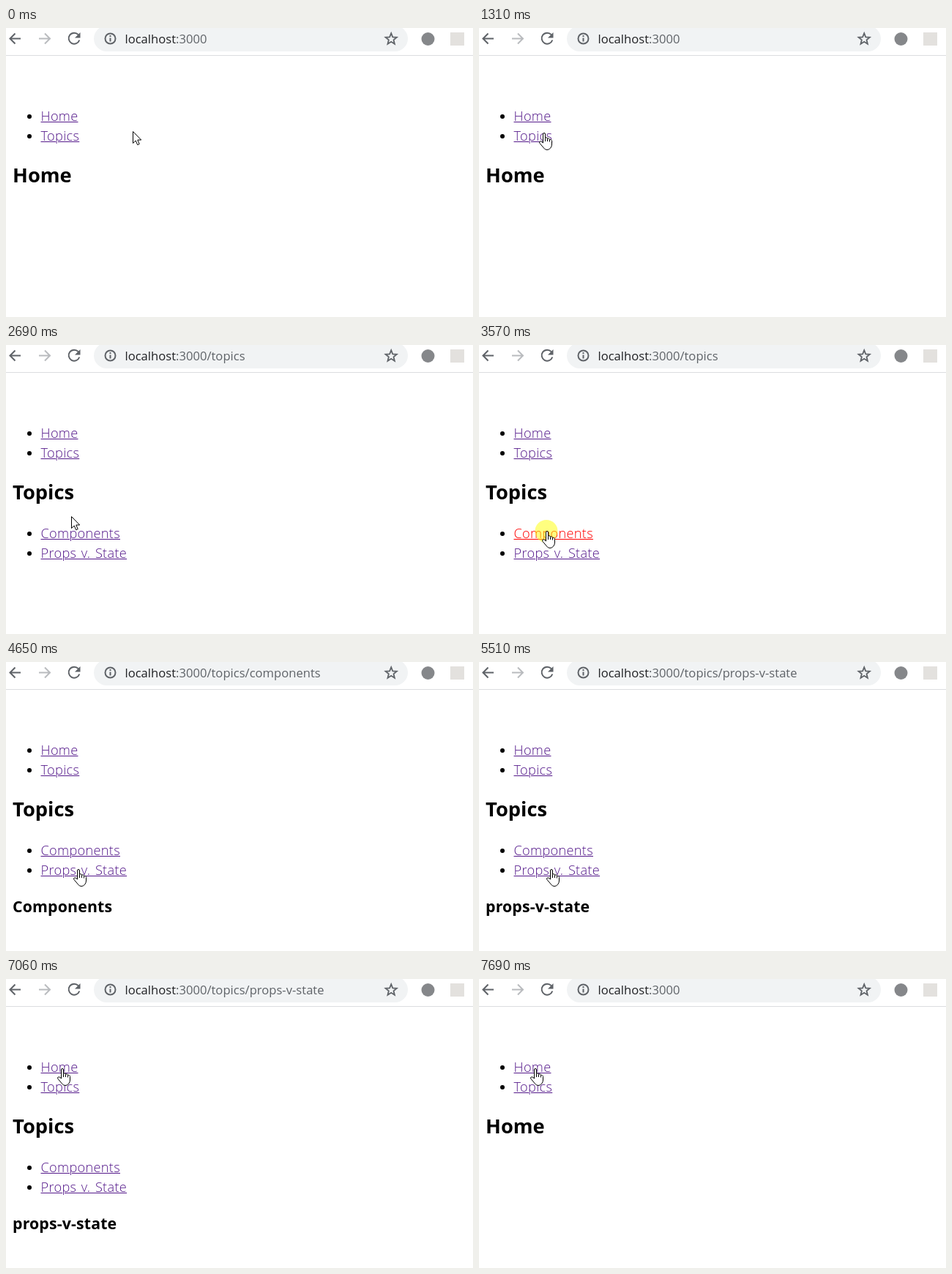
An HTML page for the animation above (8.31 s loop, 638 by 395 pixels).

```html
<!DOCTYPE html>
<html lang="en">
<head>
<meta charset="utf-8">
<title>Nested routes</title>
<style>
  html, body { margin: 0; width: 100%; height: 100%; overflow: hidden; background: #fff; }
  #stage { position: relative; width: 638px; height: 395px; overflow: hidden; }
  svg { position: absolute; left: 0; top: 0; }
  #stage > div { position: absolute; white-space: pre; line-height: normal; }
  .link {
    left: 47.5px; font: 300 18.2px "Open Sans", sans-serif; color: #551a8b;
    letter-spacing: .3px; word-spacing: 1.5px;
    text-decoration: underline 1px; text-underline-offset: 1px;
  }
  .link::before {
    content: ""; position: absolute; left: -18.5px; top: 10px;
    width: 6px; height: 6px; border-radius: 50%; background: #000;
  }
  .link.active { color: #f00; }
  .title, .subtitle { left: 9px; font: bold 27.3px "Noto Sans", sans-serif; color: #000; }
  .title { top: 182px; }
  .subtitle { top: 319px; font-size: 21.3px; letter-spacing: .15px; }
  .url { left: 162.500px; top: 3px; font: 16.6px "Open Sans", sans-serif; color: #5f6368; }
  .url b { font-weight: 400; color: #202124; }
</style>
</head>
<body>
<div id="stage">
  <svg width="638" height="395" fill="none" stroke="#5f6368" stroke-width="2">
    <rect x="120" y="-3" width="429" height="35" rx="17.5" fill="#f1f3f4" stroke="none"/>
    <rect y="37" width="638" height="1" fill="#dcdde0" stroke="none"/>
    <path d="M20 14.500H6M12.500 7.500l-7 7 7 7"/>
    <path d="M45 14.500H59.500M53 7.500l7 7-7 7" stroke="#b9bbbe"/>
    <path d="M98.800 9.200A7.500 7.500 0 1 0 100.300 16.500"/>
    <path d="M101.500 6v7.500H94z" fill="#5f6368" stroke="none"/>
    <circle cx="142.500" cy="14.500" r="7"/>
    <path d="M142.500 13.500v5M142.500 10v2"/>
    <path id="star" stroke-width="1.800"/>
    <circle cx="576.500" cy="15" r="9" fill="#85878a" stroke="none"/>
    <rect x="607" y="6" width="19" height="18" fill="#e3e1de" stroke="none"/>
  </svg>
  <div class="url"><b>localhost</b>:3000<span id="path"></span></div>
  <div class="title" id="title"></div>
  <div class="subtitle" id="subtitle"></div>
  <svg id="overlay" width="638" height="395">
    <circle id="halo" r="15.500" fill="#ff0"/>
    <g id="cursor" fill="#fff" stroke="#000" stroke-linejoin="round">
      <path id="arrow" d="M.5.5V16.500L4.200 13 6.700 18.700 9.200 17.600 6.800 12H11.700Z"/>
      <g id="hand" transform="translate(-6 0)">
        <path d="M5.500 13V2Q5.500.5 7 .5T8.500 2V7.500Q9 6.500 10.200 6.800 11.500 7 11.500 8.300
          12.300 7.600 13.300 8 14.500 8.400 14.500 9.600 15.500 9 16.500 9.600 17.500 10.200 17.500 11.500
          V16Q17.500 19 15.500 21.300 13.500 23.500 11 23.500 8 23.500 6.500 21L1 14.500Q0 12.800 1.300 12
          2.700 11.400 4 12.600L5.500 14Z"/>
        <path d="M8.500 7.500V12M11.500 8.300V12M14.500 9.600V12.500" fill="none"/>
      </g>
      <path id="beam" fill="none" d="M-3-7.500H-1L.5-6.500 2-7.500H4M.5-6.500V6.500M-3 7.500H-1L.5 6.500 2 7.500H4"/>
    </g>
  </svg>
</div>
<script>
const LOOP = 8310, FADE = 70;
const $ = id => document.getElementById(id);

const LINKS = [
  { text: "Home", top: 108, right: 98 },
  { text: "Topics", top: 135, right: 100 },
  { text: "Components", top: 245, right: 155, nested: true },
  { text: "Props v. State", top: 272, right: 166, nested: true }
];

const PAGES = [
  { from: 0, title: "Home", path: "", subtitle: "" },
  { from: 1930, title: "Topics", path: "/topics", subtitle: "" },
  { from: 3650, title: "Topics", path: "/topics/components", subtitle: "Components" },
  { from: 5440, title: "Topics", path: "/topics/props-v-state", subtitle: "props-v-state" },
  { from: 7610, title: "Home", path: "", subtitle: "" }
];

const CLICKS = [
  { down: 1780, up: 1930, link: 1 },
  { down: 3570, up: 3650, link: 2 },
  { down: 5270, up: 5440, link: 3 },
  { down: 7460, up: 7610, link: 0 }
];

// Each move visits its points at even steps from start to end.
const MOVES = [
  { start: 0, end: 0, points: [[173, 141]] },
  { start: 680, end: 1310, points: [[171, 140], [163, 138], [150, 139], [135, 141],
    [120, 143], [106, 144], [96, 145], [90, 144], [88, 143]] },
  { start: 2470, end: 3090, points: [[88, 152], [88, 182], [89, 213], [89, 234],
    [90, 243], [91, 248], [91, 251], [92, 253], [92, 254]] },
  { start: 4270, end: 4650, points: [[92, 258], [94, 266], [95, 273], [97, 279], [98, 282], [98, 283]] },
  { start: 6130, end: 6910, points: [[97, 272], [96, 250], [95, 225], [94, 200], [93, 182],
    [91, 168], [88, 158], [85, 148], [82, 140], [79, 134], [78, 131]] },
  { start: 6980, end: 7060, points: [[77, 125], [76, 122]] }
];

for (const link of LINKS) {
  link.el = document.createElement("div");
  link.el.className = "link";
  link.el.textContent = link.text;
  link.el.style.top = link.top + "px";
  $("stage").insertBefore(link.el, $("overlay"));
}

const starPoints = Array.from({ length: 10 }, (_, i) => {
  const r = i % 2 ? 3.5 : 8, a = i * Math.PI / 5;
  return `${526.2 + r * Math.sin(a)} ${15.2 - r * Math.cos(a)}`;
});
$("star").setAttribute("d", `M${starPoints.join("L")}Z`);

function pointerAt(t) {
  const { start, end, points } = MOVES.findLast(m => t >= m.start);
  const last = points.length - 1;
  const step = last ? Math.floor((t - start) / (end - start) * last + 0.2) : 0;
  return points[Math.min(last, step)];
}

function cursorKind(x, y, page) {
  const overLink = LINKS.some(l => (!l.nested || page.title === "Topics") &&
    x >= 48 && x <= l.right && y >= l.top + 2 && y <= l.top + 24);
  if (overLink) return "hand";
  return x >= 10 && x <= 96 && y >= 180 && y <= 222 ? "beam" : "arrow";
}

function render(t) {
  const page = PAGES.findLast(p => t >= p.from);
  const click = CLICKS.find(c => t >= c.down && t < c.up + FADE);
  const pressed = click && t < click.up;
  const [x, y] = pointerAt(t);
  const kind = cursorKind(x, y, page);

  $("path").textContent = page.path;
  $("title").textContent = page.title;
  $("subtitle").textContent = page.subtitle;
  LINKS.forEach((link, i) => {
    link.el.classList.toggle("active", !!pressed && click.link === i);
    link.el.style.display = link.nested && page.title === "Home" ? "none" : "";
  });

  $("halo").setAttribute("transform", `translate(${x} ${y + 0.5})`);
  $("halo").setAttribute("opacity", pressed ? 0.5 : click ? 0.25 : 0);
  $("cursor").setAttribute("transform", `translate(${x} ${y})`);
  for (const id of ["arrow", "hand", "beam"]) {
    $(id).style.display = id === kind ? "" : "none";
  }
}

const begin = performance.now();
function tick() {
  render((performance.now() - begin) % LOOP);
  requestAnimationFrame(tick);
}
tick();
</script>
</body>
</html>
```
